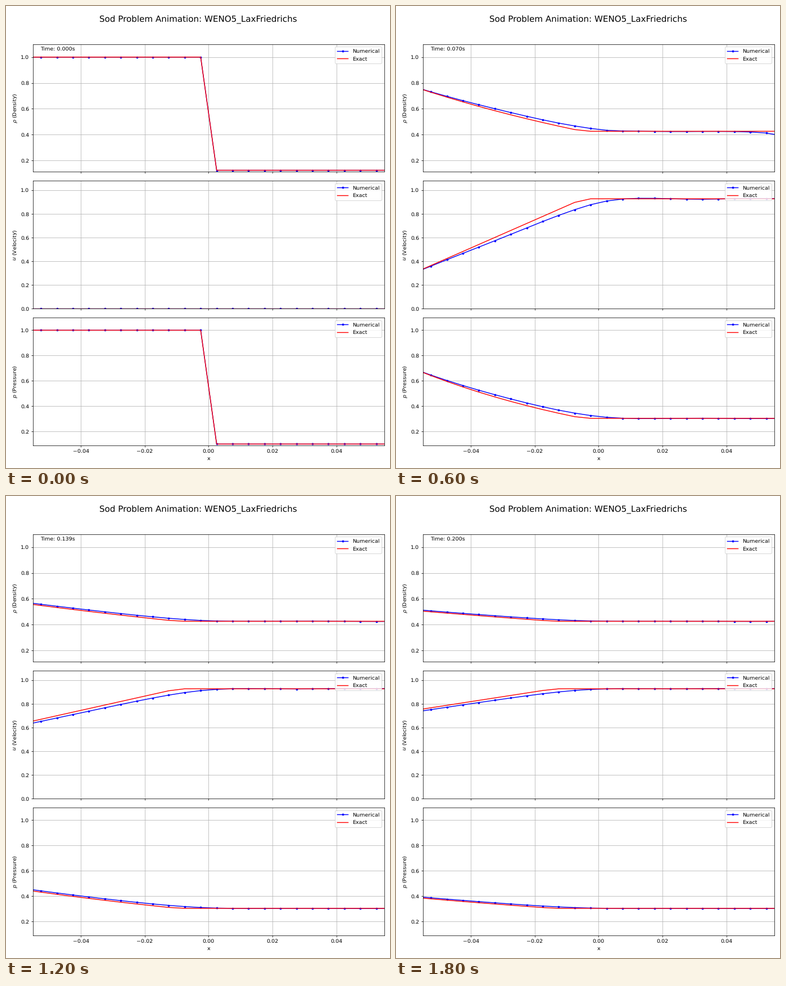
A matplotlib script that plays this animation: 683 by 820 pixels, repeating every 1.9 s.

```python
import numpy as np
import matplotlib.pyplot as plt
from matplotlib.animation import FuncAnimation

W, H, DPI = 683, 820, 68.3
FRAMES, INTERVAL = 19, 100
GAMMA = 1.4
CELLS = 200
DX = 1.0 / CELLS
X = -0.5 + DX * (np.arange(CELLS) + 0.5)
T_END = 0.2

# Left and right states (density, velocity, pressure)
LEFT = (1.0, 0.0, 1.0)
RIGHT = (0.125, 0.0, 0.1)

# Star region of the exact solution
P_STAR, U_STAR = 0.30313, 0.92745
RHO_STAR_L, RHO_STAR_R = 0.42632, 0.26557
SHOCK = 1.75216


def frame_time(i):
    return 0.0 if i == 0 else min(0.0022 + 0.01136 * i, T_END)


def exact(t):
    """Density, velocity and pressure of the exact Riemann solution."""
    if t == 0:
        return np.where(X < 0, *(np.array(s)[:, None] for s in (LEFT, RIGHT)))
    xi = X / t
    c = np.sqrt(GAMMA)
    c_star = np.sqrt(GAMMA * P_STAR / RHO_STAR_L)
    fan = (2 - (GAMMA - 1) * xi / c) / (GAMMA + 1)
    fan = np.clip(fan, 0.01, None)
    regions = [xi < -c, xi < U_STAR - c_star, xi < U_STAR, xi < SHOCK]
    rho = np.select(regions, [1.0, fan ** 5, RHO_STAR_L, RHO_STAR_R], RIGHT[0])
    u = np.select(regions, [0.0, 2 / (GAMMA + 1) * (c + xi), U_STAR, U_STAR], 0.0)
    p = np.select(regions, [1.0, fan ** 7, P_STAR, P_STAR], RIGHT[2])
    return np.array([rho, u, p])


def conserved(w):
    rho, u, p = w
    return np.array([rho, rho * u, p / (GAMMA - 1) + 0.5 * rho * u ** 2])


def primitive(q):
    rho, m, e = q
    u = m / rho
    return np.array([rho, u, (GAMMA - 1) * (e - 0.5 * m * u)])


def speed(q):
    rho, u, p = primitive(q)
    return np.abs(u) + np.sqrt(GAMMA * p / rho)


def flux(q):
    _, u, p = primitive(q)
    return np.array([q[1], q[1] * u + p, u * (q[2] + p)])


def weno5(a, b, c, d, e):
    """Fifth-order value at the face between c and d, biased towards c."""
    b0 = 13 / 12 * (a - 2 * b + c) ** 2 + 0.25 * (a - 4 * b + 3 * c) ** 2
    b1 = 13 / 12 * (b - 2 * c + d) ** 2 + 0.25 * (b - d) ** 2
    b2 = 13 / 12 * (c - 2 * d + e) ** 2 + 0.25 * (3 * c - 4 * d + e) ** 2
    w0, w1, w2 = (g / (1e-6 + s) ** 2
                  for g, s in ((0.1, b0), (0.6, b1), (0.3, b2)))
    v0 = (2 * a - 7 * b + 11 * c) / 6
    v1 = (-b + 5 * c + 2 * d) / 6
    v2 = (2 * c + 5 * d - e) / 6
    return (w0 * v0 + w1 * v1 + w2 * v2) / (w0 + w1 + w2)


def rate(q):
    """Time derivative with local Lax-Friedrichs fluxes at the faces."""
    q = np.pad(q, ((0, 0), (3, 3)), mode="edge")
    n = CELLS + 1
    ql = weno5(*(q[:, s:s + n] for s in range(5)))
    qr = weno5(*(q[:, s:s + n] for s in range(5, 0, -1)))
    alpha = np.maximum(speed(ql), speed(qr))
    face = 0.5 * (flux(ql) + flux(qr) - alpha * (qr - ql))
    return -np.diff(face, axis=1) / DX


def rk3_step(q, dt):
    q1 = q + dt * rate(q)
    q2 = 0.75 * q + 0.25 * (q1 + dt * rate(q1))
    return q / 3 + 2 / 3 * (q2 + dt * rate(q2))


def simulate():
    q, t, states = conserved(exact(0)), 0.0, []
    for i in range(FRAMES):
        stop = frame_time(i)
        while t < stop - 1e-9:
            dt = min(0.5 * DX / speed(q).max(), stop - t)
            q = rk3_step(q, dt)
            t += dt
        states.append(primitive(q))
    return states


numerical = simulate()

plt.rcParams["text.hinting"] = "none"
fig = plt.figure(figsize=((W + 1e-6) / DPI, (H + 1e-6) / DPI), dpi=DPI,
                 facecolor="white")
fig.suptitle("Sod Problem Animation: WENO5_LaxFriedrichs", y=0.9808, fontsize=16)

AX_LEFT, AX_RIGHT, AX_TOP, AX_H, PITCH = 48.1, 672.8, 67.7, 226.7, 242.65
panels = [
    (r"$\rho$ (Density)", 0.1125, 1.1),
    (r"$u$ (Velocity)", 0.0, 1.079),
    (r"$p$ (Pressure)", 0.09, 1.1),
]
axes, num_lines, exact_lines = [], [], []
for k, (label, low, high) in enumerate(panels):
    bottom = H - (AX_TOP + k * PITCH + AX_H)
    ax = fig.add_axes([AX_LEFT / W, bottom / H,
                       (AX_RIGHT - AX_LEFT) / W, AX_H / H])
    num_lines += ax.plot([], [], "b.-", label="Numerical")
    exact_lines += ax.plot([], [], "r-", label="Exact")
    ax.set_xlim(-0.055, 0.055)
    ax.set_ylim(low, high)
    ax.set_xticks([-0.04, -0.02, 0, 0.02, 0.04])
    ax.set_yticks(np.arange(0 if low == 0 else 0.2, 1.01, 0.2))
    ax.set_ylabel(label)
    ax.grid(True)
    ax.legend(loc="upper right")
    ax.tick_params(labelbottom=k == 2)
    axes.append(ax)
axes[-1].set_xlabel("x")
clock = axes[0].text(0.02, 0.95, "", transform=axes[0].transAxes)


def draw(i):
    t = frame_time(i)
    for line, y in zip(num_lines, numerical[i]):
        line.set_data(X, y)
    for line, y in zip(exact_lines, exact(t)):
        line.set_data(X, y)
    clock.set_text(f"Time: {t:.3f}s")
    return [*num_lines, *exact_lines, clock]


anim = FuncAnimation(fig, draw, frames=FRAMES, interval=INTERVAL,
                     init_func=lambda: draw(0), repeat=True, blit=False)
plt.show()
```
